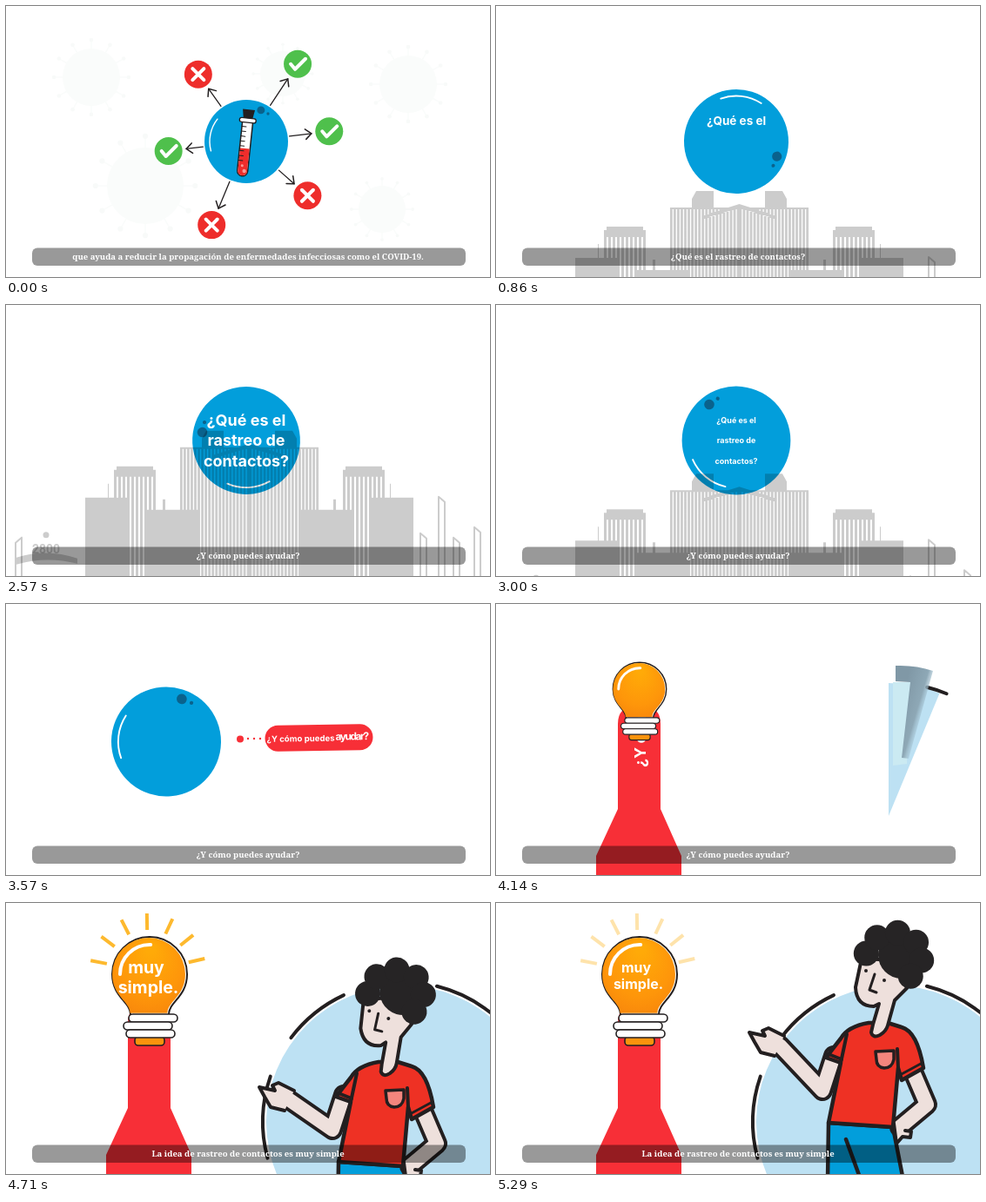
These frames come from a looping animation (556 by 312 pixels, 5.44 s). An HTML page with a canvas:

```html
<!DOCTYPE html>
<html lang="es">
<head>
<meta charset="utf-8">
<style>
html, body { margin: 0; width: 100%; height: 100%; overflow: hidden; background: #fff; }
canvas { display: block; }
</style>
</head>
<body>
<canvas id="stage" width="556" height="312"></canvas>
<script>
const c = document.getElementById('stage').getContext('2d');
const LOOP = 5440, TAU = Math.PI * 2, RAD = Math.PI / 180;
const BLUE = '#029edb', RED = '#f72f37', INK = '#231f20', SKIN = '#eee0dc', PALE = '#bde1f3';
const SANS = 'Inter, sans-serif', SLAB = '"Noto Serif", serif';

const lerp = (a, b, p) => a + (b - a) * p;
// Progress from 0 to 1 between steps a and b, and the same slowing down
const go = (k, a, b) => Math.min(1, Math.max(0, (k - a) / (b - a)));
const ease = (k, a, b) => 1 - (1 - go(k, a, b)) ** 2;
const polar = (deg, r, x = 0, y = 0) => [x + r * Math.cos(deg * RAD), y + r * Math.sin(deg * RAD)];

function paint(fill, stroke, width) {
  if (fill) { c.fillStyle = fill; c.fill(); }
  if (stroke) { c.strokeStyle = stroke; c.lineWidth = width; c.stroke(); }
}
function disc(x, y, r, fill) {
  c.beginPath(); c.arc(x, y, r, 0, TAU); paint(fill);
}
function arc(x, y, r, from, to, color, width) {
  c.beginPath(); c.arc(x, y, r, from * RAD, to * RAD); paint(null, color, width);
}
function poly(pts, fill, stroke, width) {
  c.beginPath();
  pts.forEach(p => c.lineTo(...p));
  c.closePath();
  paint(fill, stroke, width);
}
function line(pts, stroke, width) {
  c.beginPath();
  pts.forEach(p => c.lineTo(...p));
  paint(null, stroke, width);
}
function curve(d, fill, stroke, width) {
  const path = new Path2D(d);
  if (fill) { c.fillStyle = fill; c.fill(path); }
  if (stroke) { c.strokeStyle = stroke; c.lineWidth = width; c.stroke(path); }
}
function pill(x, y, w, h, r, fill, stroke, width) {
  c.beginPath(); c.roundRect(x, y, w, h, r); paint(fill, stroke, width);
}
function text(s, x, y, size, family = SANS, align = 'center', color = '#fff') {
  c.font = `700 ${size}px ${family}`;
  c.textAlign = align;
  c.fillStyle = color;
  c.fillText(s, x, y);
}
function placed(x, y, turn, scale, draw) {
  c.save(); c.translate(x, y); c.rotate(turn * RAD); c.scale(scale, scale); draw(); c.restore();
}

// Faint germs behind the opening diagram
function drawGerms(alpha) {
  c.globalAlpha = alpha;
  for (const [x, y, r] of [[98, 82, 33], [462, 90, 33], [160, 207, 44], [318, 78, 26], [432, 234, 27]]) {
    disc(x, y, r, '#fafcfb');
    for (let a = 0; a < 360; a += 30) {
      line([polar(a, r, x, y), polar(a, r * 1.27, x, y)], '#fafcfb', 1.5);
      disc(...polar(a, r * 1.3, x, y), r * .07, '#f8faf9');
    }
  }
  c.globalAlpha = 1;
}

// Direction and distance of each badge, and whether it is good
const results = [[-125.5, 95], [-56.5, 107, true], [-7, 96, true], [41.5, 94], [112.5, 104], [173, 90, true]];
function drawResults(scale) {
  placed(276, 156, 0, scale, () => {
    for (const [a, d, good] of results) {
      const tip = polar(a, d - 20.5);
      line([polar(a, 50), tip], INK, 1.3);
      line([polar(a + 140, 9, ...tip), tip, polar(a - 140, 9, ...tip)], INK, 1.5);
      placed(...polar(a, d), 0, 1, () => {
        disc(0, 0, 16, good ? '#4fc04c' : '#ee2d2b');
        if (good) return line([[-8, 0], [-3, 6], [9, -6]], '#fff', 4);
        for (const s of [-1, 1]) line([[-6.5 * s, -6.5], [6.5 * s, 6.5]], '#fff', 4);
      });
    }
  });
}
function drawTube(scale) {
  placed(275, 158, 6, scale, () => {
    poly([[-7, -39], [7, -39], [5, -27], [-5, -27]], INK);
    pill(-6, -26, 12, 64, [0, 0, 6, 6], '#fff', INK, 1.5);
    pill(-5.3, 6, 10.6, 31.3, [0, 0, 5, 5], '#ee2d2b');
    pill(-9.5, -29, 19, 5, 2.5, '#fff', INK, 1.3);
    for (let y = -19; y < 22; y += 5.6) line([[-6, y], [-1, y]], INK, 1);
    disc(-1, 26, 1.5, '#f79a98');
    disc(2, 32, 2.2, '#f79a98');
  });
}

function drawBall(k) {
  const r = (48 + 12 * ease(k, 0, 6) + 3 * go(k, 6, 25)) * (1 - go(k, 25, 29));
  const x = 276 - 92 * ease(k, 21, 25) - 34 * go(k, 25, 29);
  placed(x, 156 + 2.5 * go(k, 21, 25), 14.2 * k, r, () => {
    disc(0, 0, 1, BLUE);
    arc(0, 0, .875, 165, 218, '#fff', .03);
    disc(...polar(-65, .83), .093, '#0a628c');
    disc(...polar(-52, .846), .034, '#0a628c');
  });
}

// City skyline, mirrored about its middle, in one path so that overlaps stay even
const MIDDLE = 279.5, GROUND = 520;
const city = new Path2D();
function block(x, y, w, h = GROUND - y) {
  city.rect(x, y, w, h);
  city.rect(2 * MIDDLE - x - w, y, w, h);
}
for (let x = MIDDLE; x > 201; x -= 4.04) block(x - 2.8, 163, 2.8);
block(201, 163, 78.5, 2);
city.addPath(new Path2D('M238 172 279.5 159 321 172V176L279.5 163.5 238 176Z'));
city.addPath(new Path2D('M225 153 230 144H250V163H225ZM309 144H329L334 153V163H309Z'));
block(127, 185, 42, 4);
block(124, 189, 48, 8);
for (let x = 124; x < 172; x += 5) block(x, 197, 3);
block(91, 221, 49);
block(162, 235, 60);
block(117, 205, 1, 16);
block(180, 223, 3, 12);
function drawCity(drop) {
  c.save();
  c.translate(0, drop);
  c.globalAlpha = .2;
  c.fillStyle = '#000';
  c.fill(city);
  for (const [x, y] of [[11, 273], [476, 262], [497, 220], [514, 267], [538, 255]])
    poly([[x, y], [x + 7, x < MIDDLE ? y - 6 : y + 6], [x + 7, GROUND], [x, GROUND]], null, '#000', 2);
  curve('M12 290Q46 279 82 291V297Q46 288 12 298Z', '#000');
  text('2800', 46, 285, 14, 'Roboto, sans-serif', 'center', '#000');
  disc(46, 264, 3.5, '#000');
  c.restore();
}

function drawTitle(k) {
  ['¿Qué es el', 'rastreo de', 'contactos?'].forEach((s, i) => {
    const size = 18 * ease(k, 4 + 2 * i, 8 + 2 * i) * (1 - go(k, 20, 22));
    if (size) text(s, 276, 156 + 23.5 * (i - 1) + size * .35, size);
  });
}

function drawPill(k) {
  const grow = ease(k, 22, 25), spin = go(k, 25, 28);
  if (!spin) {
    disc(269, 155.5, 4 * grow, RED);
    for (let x = 278; x < 293; x += 7) disc(x, 155, 1.2 * grow, RED);
  }
  placed(lerp(359.5, 165, spin), lerp(154, 170, spin), lerp(-.8, -90, spin), grow * lerp(1, 1.67, spin), () => {
    pill(-62, -15, 124, 30, 15, RED);
    text('¿Y cómo puedes', -60, 4, 9.6, SANS, 'left');
    c.letterSpacing = lerp(-1.5, 0, spin) + 'px';
    text('ayudar?', 19, 3, lerp(12, 10, spin), SANS, 'left');
    c.letterSpacing = '0px';
  });
}

function drawStand(k) {
  c.save();
  c.translate(0, 40 * (1 - go(k, 28, 29)));
  const body = 'M140 236V138Q140 118 160 118H169Q189 118 189 138V236L213 290V360H115V290Z';
  curve(body, RED);
  c.clip(new Path2D(body));
  if (k < 31) placed(172, 188, -90, 1, () => text('¿Y cómo', 0, 0, 18, SANS, 'left'));
  c.restore();
}

function drawBulb(k) {
  const scale = ease(k, 27, 31.3), pulse = Math.cos((k - 33) * Math.PI / 4), lit = ease(k, 30, 32);
  c.lineCap = 'butt';
  c.globalAlpha = lit * (.7 + .3 * pulse);
  for (let i = 0; i < 7; i++) {
    const a = -169 + 26 * i;
    line([polar(a, 48, 163, 79), polar(a, lerp(48, 67, lit), 163, 79)], '#fdb92e', 4);
  }
  c.globalAlpha = 1;
  c.lineCap = 'round';
  placed(165, 82 + 56 * (1 - scale), 0, scale, () => {
    const glow = c.createRadialGradient(2, -30, 5, 0, 0, 60);
    glow.addColorStop(0, '#ffaa08');
    glow.addColorStop(.6, '#fe960a');
    glow.addColorStop(1, '#f6820c');
    const glass = 'M-22 46C-22 32-43 26-43 0A43 43 0 0 1 43 0C43 26 22 32 22 46';
    curve(glass, '#fff', INK, 2);
    placed(-1, 0, 0, .975, () => curve(glass, glow));
    arc(0, 0, 34, 180, 272, '#fff', 4);
    pill(-17, 72, 34, 10, 4, '#fb930d', INK, 1.6);
    [-24, -30, -27].forEach((x, i) => pill(x, 46 + 9 * i, 56, 9, 4.5, '#fff', INK, 1.6));
  });
  const size = lit * (17.75 + 1.75 * pulse);
  if (size) {
    text('muy', 161, 75 + size * .3, size);
    text('simple.', 163.5, 75 + size * 1.48, size);
  }
}

function drawHalo(k) {
  const end = 360 * go(k, 28, 32) ** 2 - 90, full = go(k, 29, 32);
  const x = lerp(451, 456, full), y = lerp(244, 252, full);
  c.beginPath();
  c.moveTo(x, y);
  c.arc(x, y, lerp(153, 157, full), -90 * RAD, end * RAD);
  paint(PALE);
  // Dark ring pieces, uncovered together with the disc
  for (const [from, to] of [[-76, 40], [165, 199], [217, 245]])
    if (end > from) arc(456, 252, 161, from, Math.min(to, end), INK, 4);
  if (k === 29) {
    const blur = c.createLinearGradient(462, 120, 496, 130);
    blur.addColorStop(0, '#8098a6');
    blur.addColorStop(.6, '#8ea8b6');
    blur.addColorStop(1, '#bde1f300');
    curve('M456 90H476L472 184 456 186Z', '#cbeaf2');
    curve('M459 71Q482 70 502 77L474 178 466 177 476 90 459 89Z', blur);
  }
}

function limb(pts) {
  line(pts, INK, 24);
  line(pts, SKIN, 16);
}
function drawHead() {
  curve('M420 64L413 97Q414 119 434 119L440 116 433 140 431 149Q433 156 441 152 448 148 450 141L458 112 472 98 460 66Z',
    SKIN, INK, 4);
  disc(466, 60, 27, '#262425');
  for (let a = 188; a < 450; a += 45)
    disc(457 + 32 * Math.cos(a * RAD), 62 + 28 * Math.sin(a * RAD), 14.5, '#262425');
  disc(425, 78, 2, INK);
  disc(446, 89, 2, INK);
  line([[435, 82], [429, 100], [437, 103]], INK, 3);
}
function drawPerson(k) {
  const rise = 48 * .5 ** (k - 33) - 3, lean = Math.min(1, rise / 45), dip = 18 * lean;
  c.save();
  c.translate(0, rise);
  curve('M382 253L456 258 470 330V520H378Z', BLUE, INK, 4.5);
  line([[402, 272], [421, 324]], INK, 4.5);
  // Arm on the hip
  limb([[478, 192], [495, 232], [464, 258]]);
  curve('M457 254L460 277 467 269 476 270 477 263 470 262', SKIN, INK, 4);
  // Pointing arm
  limb([[388, 176], [375, 216], [326, 164 + dip]]);
  placed(0, dip, 0, 1, () =>
    curve('M331 153L313 144 306 147 309 153 291 149 297 160 304 172 320 176', SKIN, INK, 4));
  // Shirt
  curve('M428 138Q404 142 396 156L379 178 396 184 382 253 456 258 462 190 466 204 491 190Q484 148 466 143L450 138Z',
    '#ee3124', INK, 4.5);
  line([[403, 151], [396, 184]], INK, 4);
  line([[461, 168], [462, 190]], INK, 4);
  line([[382, 174], [397, 180]], INK, 4);
  line([[464, 198], [488, 185]], INK, 3);
  curve('M436 171L457 170V180Q455 190 446 190 437 189 437 180Z', '#f4857d', INK, 3.5);
  placed(433, 152, -6 * lean, 1, () => {
    c.translate(-433, -152);
    drawHead();
  });
  c.restore();
}

function drawCaption(k) {
  pill(30, 278.5, 498, 20.5, 6, 'rgba(0,0,0,.4)');
  const s = k < 4 ? 'que ayuda a reducir la propagación de enfermedades infecciosas como el COVID-19.'
    : k < 17 ? '¿Qué es el rastreo de contactos?'
    : k < 31 ? '¿Y cómo puedes ayudar?' : 'La idea de rastreo de contactos es muy simple';
  text(s, 278, 292, 9.55, SLAB);
}

function scene(k) {
  c.fillStyle = '#fff';
  c.fillRect(0, 0, 556, 312);
  c.lineCap = c.lineJoin = 'round';
  const opening = 1 - go(k, 0, 4);
  if (opening) {
    drawGerms(opening);
    drawResults(opening);
  }
  if (k < 29) drawBall(k);
  if (opening) drawTube(opening);
  if (k > 3 && k < 24) drawCity(69 * .68 ** (k - 6) + 200 * go(k, 18, 24) ** 2);
  drawTitle(k);
  if (k > 22 && k < 28) drawPill(k);
  if (k > 27) {
    drawStand(k);
    drawBulb(k);
  }
  if (k > 28) drawHalo(k);
  if (k > 29) drawPerson(k);
  drawCaption(k);
}

// The picture advances seven times a second.
function tick() {
  const t = performance.now() % LOOP;
  scene(Math.min(37, Math.floor((t + 6) * 7 / 1000)));
  requestAnimationFrame(tick);
}
tick();
</script>
</body>
</html>
```
